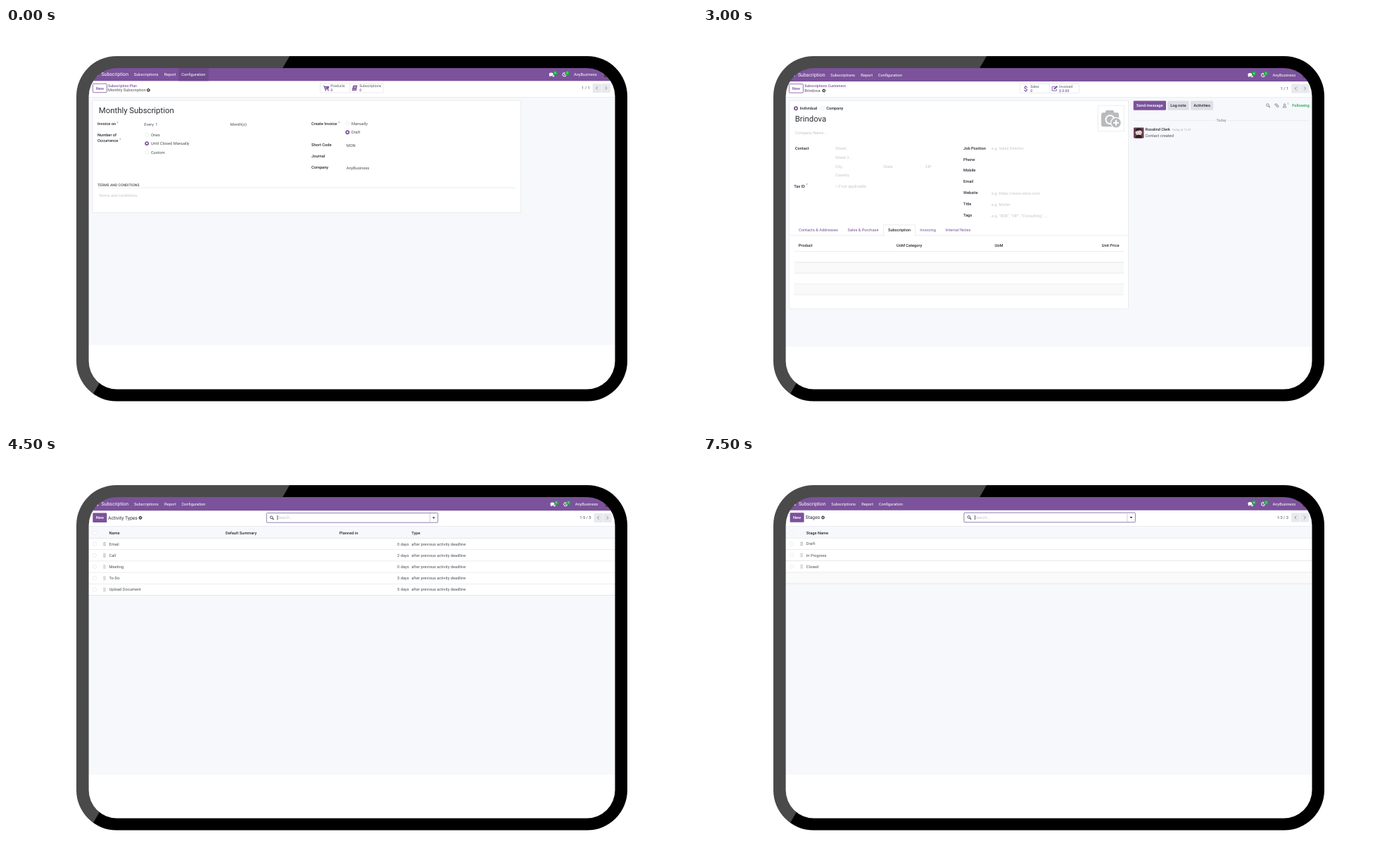
An HTML page with a canvas for the animation above (8 s loop, 982 px wide and 570 px high).

```html
<!DOCTYPE html>
<html lang="en">
<head>
<meta charset="utf-8">
<title>Subscription screens</title>
<style>
html, body { margin: 0; width: 100%; height: 100%; overflow: hidden; background: #fff; }
canvas { display: block; width: 982px; height: 570px; }
</style>
</head>
<body>
<canvas id="stage" width="982" height="570"></canvas>
<script>
const ctx = document.getElementById('stage').getContext('2d');
const PURPLE = '#7b529b', DARK = '#2b2f35', TEXT = '#4d5259', MUTED = '#70757c', FAINT = '#c3c6ca';
const LINE = '#e5e7ea', PAGE = '#f7f8fb', BUTTON = '#dcdfe5', GREEN = '#1fa84b';
const COMPANY = 'AnyBusiness', PERSON = 'Rosalind Clerk', CUSTOMER = 'Brindova';
const BASE = 5.7, TAB_WIDTH = 38.8;
const LEFT = 117, TOP = 57, WIDTH = 749;

// ---- Primitives ----
function text(str, x, y, { size = BASE, color = TEXT, weight = 400, align = 'left' } = {}) {
  ctx.font = `${weight} ${size}px Roboto, sans-serif`;
  ctx.textRendering = 'geometricPrecision';
  ctx.textAlign = align;
  ctx.fillStyle = color;
  ctx.fillText(str, x, y + size * 0.36);
}
const label = (str, x, y, options) => text(str, x, y, { color: DARK, weight: 500, ...options });
const faint = (str, x, y) => text(str, x, y, { color: FAINT });
const help = (x, y) => text('?', x, y, { size: 4.4, color: '#3994b4', weight: 500 });

function rect(x, y, w, h, fill, stroke, radius = 0, width = 0.8) {
  ctx.beginPath();
  ctx.roundRect(x, y, w, h, radius);
  if (fill) { ctx.fillStyle = fill; ctx.fill(); }
  if (stroke) { ctx.strokeStyle = stroke; ctx.lineWidth = width; ctx.stroke(); }
}
function circle(x, y, r, fill, stroke, width = 0.8) {
  ctx.beginPath();
  ctx.arc(x, y, r, 0, Math.PI * 2);
  if (fill) { ctx.fillStyle = fill; ctx.fill(); }
  if (stroke) { ctx.strokeStyle = stroke; ctx.lineWidth = width; ctx.stroke(); }
}
function path(d, x, y, { fill, stroke, width = 0.9 } = {}) {
  const shape = new Path2D(d);
  ctx.save();
  ctx.translate(x, y);
  if (fill) { ctx.fillStyle = fill; ctx.fill(shape); }
  if (stroke) { ctx.strokeStyle = stroke; ctx.lineWidth = width; ctx.stroke(shape); }
  ctx.restore();
}
const rule = (x, y, w, color = LINE) => rect(x, y - 0.4, w, 0.8, color);

// ---- Icons, each centred on its point ----
const gear = (x, y) => {
  ctx.setLineDash([1, 0.7]);
  circle(x, y, 2.1, null, DARK, 0.9);
  ctx.setLineDash([]);
  circle(x, y, 1.5, null, DARK, 1.1);
};
const magnifier = (x, y, color = DARK) => {
  circle(x - 0.6, y - 0.6, 1.8, null, color, 0.8);
  path('M.8 .8L2.7 2.7', x, y, { stroke: color, width: 1.1 });
};
const cart = (x, y) => {
  path('M-4-3H-2.6L-1.5 1.6H3.4M-2.2-2.2H4L3.2.4L-1.7.8Z', x, y, { fill: PURPLE, stroke: PURPLE });
  for (const dx of [-1, 3]) circle(x + dx, y + 3.2, 0.9, PURPLE);
};
const book = (x, y) => {
  path('M-2-3.8H4L2.2 3.8H-3.4Q-4.4 3-3.6 1.8Z', x, y, { fill: PURPLE });
  path('M-1-2H2.4M-1.4-.4H2M-3 2.4H1.6', x, y, { stroke: '#fff', width: 0.6 });
};
const page = (x, y) =>
  path('M-3-4H1L3-2V4H-3ZM-1.6-1H1.6M-1.6.8H1.6M-1.6 2.5H1.6', x, y, { stroke: PURPLE });
const bars = (x, y) => {
  for (let i = 0; i < 5; i++) rect(x - 4.4 + i * 1.8, y + 2.6 - i * 1.6, 1.3, 1.2 + i * 1.6, PURPLE);
};
const pencilBox = (x, y) => {
  path('M1-2.8H-3.6V3.2H2.6V.8', x, y, { stroke: PURPLE });
  path('M-1.4 1.2L-1-.6L3-4L4.4-2.6L.4 1Z', x, y, { fill: PURPLE });
};
const dollar = (x, y) => text('$', x, y, { size: 10, color: PURPLE, weight: 500, align: 'center' });
const camera = (x, y) => {
  const gray = '#b9babc';
  rect(x - 14, y - 10, 25, 20, gray, null, 3);
  rect(x - 8, y - 13.3, 12, 6, gray, null, 2);
  circle(x - 1.5, y, 6, null, '#fff', 2);
  circle(x + 7, y + 4.5, 7.4, gray, '#fff', 1.2);
  path('M-4 0H4M0-4V4', x + 7, y + 4.5, { stroke: '#fff', width: 2 });
};
const star = (x, y) => {
  ctx.beginPath();
  for (let i = 0; i < 10; i++) {
    const r = i % 2 ? 2.6 : 5.6, a = i * Math.PI / 5;
    ctx.lineTo(x + r * Math.sin(a), y - r * Math.cos(a));
  }
  ctx.closePath();
  ctx.strokeStyle = '#62666c';
  ctx.lineWidth = 0.8;
  ctx.stroke();
};
const paperclip = (x, y) => {
  ctx.save();
  ctx.translate(x, y);
  ctx.rotate(-0.8);
  rect(-1.3, -3, 2.6, 6, null, MUTED, 1.3, 0.8);
  rect(-0.3, -1.5, 0.6, 3, MUTED);
  ctx.restore();
};
const user = (x, y, color) => {
  circle(x, y - 1.3, 1.3, null, color, 0.7);
  path('M-2.3 2.7Q-2.2.3 0 .3T2.3 2.7Z', x, y, { stroke: color, width: 0.7 });
};
function avatar(x, y) {
  rect(x, y, 14.5, 14.8, '#6b4055', null, 1);
  circle(x + 7.2, y + 6.6, 4.6, '#e4cfc6');
  path('M-5-.6Q-5-5 0-5T5-.6L2-2.4Z', x + 7.2, y + 6, { fill: '#2a2028' });
  path('M-5 4.6Q-4 0 0 0T5 4.6Z', x + 7.2, y + 10.2, { fill: '#2a2028' });
}

// ---- Controls ----
function button(str, x, y, w, h, fill, color = DARK, stroke) {
  rect(x, y, w, h, fill, stroke, 1.2);
  text(str, x + w / 2, y + h / 2, { color, weight: 500, align: 'center' });
}
const newOutlined = (x, y) => button('New', x, y, 20, 12.5, '#fff', PURPLE, PURPLE);
const newFilled = (x, y) => button('New', x, y, 20, 13.5, PURPLE, '#fff');

function radio(str, x, y, on, options) {
  if (on) circle(x, y, 2.1, '#fff', PURPLE, 1.7);
  else circle(x, y, 2.7, '#fff', LINE, 0.7);
  text(str, x + 5.7, y, options);
}
function checkbox(x, y) {
  rect(x, y, 5.6, 5.6, PURPLE, null, 1);
  path('M1.4 2.9L2.4 4L4.3 1.7', x, y, { stroke: '#fff', width: 0.8 });
}
function pager(str, x, y) {
  text(str, x - 4, y, { align: 'right' });
  for (const [dx, d] of [[0, 'M1-2.2L-1.2 0L1 2.2'], [12.9, 'M-1-2.2L1.2 0L-1 2.2']]) {
    rect(x + dx, y - 6.5, 12.4, 13, '#e7e9ed', null, 1);
    path(d, x + dx + 6.2, y, { stroke: MUTED, width: 0.8 });
  }
}
// Each entry is [icon, icon x, text x, name, value].
function stats(x, y, w, split, entries) {
  rect(x, y - 6.5, w, 13, '#fff', LINE, 1);
  rect(split, y - 6.5, 0.8, 13, LINE);
  for (const [icon, iconX, textX, name, value] of entries) {
    icon(iconX, y);
    text(name, textX, y - 2.8, { size: 5.1 });
    text(value, textX, y + 3, { size: 5.1, color: PURPLE, weight: 500 });
  }
}
function breadcrumb(parent, current, x, y, gearX) {
  text(parent, x, y - 3.3, { size: 5.2, color: PURPLE, weight: 500 });
  text(current, x, y + 3.2);
  gear(gearX, y + 3.2);
}
function tabs(x, y, w, names, active) {
  rule(x, y + 7.5, w);
  for (const [name, tx] of names) {
    const on = name === active;
    if (on) path(`M${tx - 6.5} ${y + 7.9}V${y - 7.5}H${tx + TAB_WIDTH}V${y + 7.9}`, 0, 0,
      { fill: '#fff', stroke: LINE, width: 0.8 });
    text(name, tx, y, { color: on ? DARK : PURPLE, weight: on ? 500 : 400 });
  }
}
function photoBox(x, y) {
  rect(x, y, 37, 36.5, '#fff', LINE);
  camera(x + 18.7, y + 20);
}
function search(x, y, cursor) {
  rect(x, y - 6.8, 243.5, 13.6, '#fff', '#8573a7', 1, 0.9);
  rect(x + 231.7, y - 6.5, 0.7, 13, '#c3b5cf');
  path('M-2-1H2L0 1.3Z', x + 237.5, y, { fill: DARK });
  magnifier(x + 7.5, y);
  faint('Search...', x + 15.2, y);
  if (cursor) rect(x + 15.2, y - 3.3, 0.7, 6.6, DARK);
}
function chatter(dx, dy, message, followers, follow, followX, followColor) {
  ctx.save();
  ctx.translate(dx, dy);
  button('Send message', 612.7, 102.8, 46.3, 13.4, PURPLE, '#fff');
  button('Log note', 661, 102.8, 30.6, 13.4, BUTTON);
  button('Activities', 694, 102.8, 32, 13.4, BUTTON);
  magnifier(804, 109.5, MUTED);
  paperclip(816.5, 109.5);
  const userColor = followers === '0' ? FAINT : MUTED;
  user(827.5, 109.7, userColor);
  text(followers, 831, 107, { size: 4.2, color: userColor });
  text(follow, followX, 109.5, { color: followColor, weight: 500 });
  rule(613, 130.8, 116);
  rule(746, 130.8, 116);
  text('Today', 737.5, 130.8, { size: 5.3, color: '#92969c', weight: 500, align: 'center' });
  avatar(613, 141);
  label(PERSON, 629.5, 143.7, { size: 5.5 });
  text('Today at 12:41', 667.5, 143.9, { size: 4.2, color: '#acb0b5' });
  text(message, 629.5, 152);
  ctx.restore();
}

// ---- Shared page parts ----
function pageBase({ navX, navY, companyX, bottom, active }) {
  const navHeight = navY + 9.2 - TOP;
  rect(LEFT, TOP, WIDTH, bottom - TOP, PAGE);
  rect(LEFT, TOP, WIDTH, 41, '#fff');
  rule(LEFT, 98.4, WIDTH);
  rect(LEFT, TOP, WIDTH, navHeight, PURPLE);
  const items = [['Subscriptions', 46.3, 34.7], ['Report', 89.3, 17], ['Configuration', 113.8, 34.4]];
  for (const [name, dx, w] of items) {
    if (name === active) rect(navX + dx - 4, TOP, w + 8, navHeight, '#6f4a8d');
    text(name, navX + dx, navY, { color: '#fff' });
  }
  text('Subscription', navX, navY, { size: 6.9, color: '#fff' });
  rect(navX - 6.5, navY + 0.5, 2, 1.8, '#fff');

  const chatX = companyX - 32, clockX = companyX - 13.5;
  path('M-3.2-.3A3 2.3 0 1 1 0 2L-2.5 3Z', chatX, navY, { fill: '#fff' });
  path('M0 2.6Q3 2.6 3.4 0Q5 2 3.6 3.6L1.8 3Z', chatX, navY, { fill: '#fff' });
  circle(clockX, navY + 0.2, 2.6, null, '#fff', 1);
  path('M0-1.6V.4H1.6', clockX, navY, { stroke: '#fff', width: 0.8 });
  for (const [x, n] of [[chatX + 5.5, '6'], [clockX + 4.2, '2']]) {
    circle(x, navY - 2, 3.1, GREEN);
    text(n, x, navY - 2, { size: 4, color: '#fff', align: 'center' });
  }
  text(COMPANY, companyX, navY, { color: '#fff' });
  rect(companyX + 43, navY - 4, 8, 8, '#55394a');
}
function listBase(title, gearX, x, total, pagerX, searchX, cursor, y) {
  newFilled(x, y - 6.8);
  text(title, x + 21.8, y, { size: 6.8, color: DARK });
  gear(gearX, y);
  search(searchX, y, cursor);
  pager(total, pagerX, y);
}
function listRows(x, names, edges, striped = []) {
  rect(LEFT, 115.5, WIDTH, edges.at(-1) - 115.5, '#fff');
  for (const i of striped) rect(LEFT, edges[i], WIDTH, edges[i + 1] - edges[i], '#fafafb');
  for (const y of edges) rule(LEFT, y, WIDTH);
  circle(x, 108, 2.7, '#fff', LINE, 0.7);
  names.forEach((name, i) => {
    const y = (edges[i] + edges[i + 1]) / 2;
    circle(x, y, 2.7, '#fff', LINE, 0.7);
    for (let k = 0; k < 6; k++) rect(x + 12.5 + k % 2 * 1.9, y - 2.5 + (k >> 1) * 2, 1.1, 1.1, '#8e9298');
    text(name, x + 20.6, y);
  });
}

// ---- Screens ----
function planScreen() {
  pageBase({ navX: 135.5, navY: 66, companyX: 807, bottom: 450.5, active: 'Configuration' });
  newOutlined(123.4, 79.2);
  breadcrumb('Subscription Plan', 'Monthly Subscription', 145, 85.1, 202.4);
  stats(446.5, 85.4, 89.5, 488.3, [
    [cart, 455, 461.3, 'Products', '0'], [book, 495.5, 502.3, 'Subscriptions', '0']]);
  pager('1 / 1', 833.6, 85.4);
  rect(123.2, 103, 608.5, 159.5, '#fff', LINE);
  text('Monthly Subscription', 131.8, 117, { size: 11.35, color: DARK });
  label('Invoice on', 130, 135.7);
  help(157.5, 134.2);
  text('Every', 196.3, 136.5);
  text('1', 212.3, 136.5);
  text('Month(s)', 318.7, 136.5);
  label('Number of', 130, 151.7);
  label('Occurrence', 130, 160);
  help(161, 158);
  ['Ones', 'Until Closed Manually', 'Custom'].forEach((name, i) => radio(name, 200.2, 151.7 + i * 12.4, i === 1));
  label('Create Invoice', 434, 135.7);
  help(472, 134.2);
  radio('Manually', 485.3, 135.7);
  radio('Draft', 485.3, 148.3, true);
  label('Short Code', 434, 166);
  text('MON', 483.7, 167);
  label('Journal', 434, 182);
  label('Company', 434, 197.8);
  text(COMPANY, 483.7, 198.5);
  label('TERMS AND CONDITIONS', 130, 223, { size: 5.1, color: TEXT });
  rule(130, 227.2, 595);
  faint('Terms and conditions.', 131.5, 238.3);
}

function productScreen() {
  pageBase({ navX: 137, navY: 66.3, companyX: 810, bottom: 451.5 });
  newOutlined(124.4, 79.3);
  breadcrumb('Products', 'New', 146, 85.4, 161.7);
  path('M-2 2H2Q3.2 1 2-.5Q1.6-2.6-.4-2Q-2-1.8-2-.3Q-3.6.8-2 2Z', 174.4, 88.5, { fill: DARK });
  path('M-1.6-1.6L1.6 1.6M1.6-1.6L-1.6 1.6', 185, 88.6, { stroke: DARK, width: 1.2 });
  stats(450.5, 85.6, 86.3, 494.3, [
    [page, 459, 465.5, 'Documents', '0'], [bars, 502.3, 508.5, 'Sold', '0.00']]);
  button('Print Labels', 124.3, 102.6, 39.6, 13.6, BUTTON);
  rect(124.3, 119.8, 481.5, 145.8, '#fff', LINE);
  label('Product', 131.2, 130.3);
  star(136.7, 141.8);
  text('Monthly Sunscription Product', 151.8, 142.3, { size: 11.4, color: DARK });
  photoBox(562.5, 126);
  checkbox(131.3, 158.4);
  text('Sales', 139.8, 161.2);
  checkbox(159.8, 158.4);
  text('Purchase', 168.5, 161.2);
  tabs(124.3, 180.5, 481.5, [['General Information', 138], ['Attributes & Variants', 201.8],
    ['Sales', 267.3], ['Subscription', 294.5]], 'Subscription');
  label('SUBSCRIPTION', 131.2, 208.7, { size: 5.1, color: TEXT });
  rule(131, 212.7, 227);
  label('Is Subscription', 131.2, 226.4);
  help(170.8, 224.8);
  checkbox(188.3, 223.8);
  label('Subscription Plan', 131.2, 241);
  help(177.6, 239.4);
  text('Monthly Subscription', 189.8, 241.8);
  chatter(0, 0, 'Creating a new record...', '0', 'Follow', 845.5, TEXT);
}

function customerScreen() {
  pageBase({ navX: 135, navY: 66.7, companyX: 809.5, bottom: 453 });
  newOutlined(122.4, 79.6);
  breadcrumb('Subscriptions Customers', CUSTOMER, 144.3, 85.8, 171.8);
  stats(450, 86, 84.5, 492.3, [
    [dollar, 458.7, 465.2, 'Sales', '0'], [pencilBox, 499.8, 506, 'Invoiced', '$ 0.00']]);
  pager('1 / 1', 836.3, 86);
  rect(122.5, 103.3, 482, 295.7, '#fff', LINE);
  radio('Individual', 132, 114.2, true, { color: DARK, weight: 500 });
  radio('Company', 169.5, 114.2, false, { color: DARK, weight: 500 });
  text(CUSTOMER, 130.7, 129, { size: 11.4, color: DARK });
  faint('Company Name...', 130.7, 149);
  photoBox(561.3, 110.2);
  label('Contact', 130.7, 171);
  for (const [str, x, y] of [['Street...', 188, 171.3], ['Street 2...', 188, 184], ['City', 188, 196.7],
    ['State', 256.2, 196.7], ['ZIP', 316, 196.7], ['Country', 188, 209.2], ['/ if not applicable', 188, 225]])
    faint(str, x, y);
  label('Tax ID', 129.2, 224.5);
  help(146.4, 222.5);
  const fields = [['Job Position', 'e.g. Sales Director'], ['Phone'], ['Mobile'], ['Email'],
    ['Website', 'e.g. https://www.odoo.com'], ['Title', 'e.g. Mister'], ['Tags', 'e.g. "B2B", "VIP", "Consulting", ...']];
  fields.forEach(([name, hint], i) => {
    const y = 170.6 + i * 15.9;
    label(name, 370, y);
    if (hint) faint(hint, 410, y + 0.6);
  });
  tabs(122.5, 287.4, 482, [['Contacts & Addresses', 136], ['Sales & Purchase', 205.6],
    ['Subscription', 263], ['Invoicing', 308.2], ['Internal Notes', 344.7]], 'Subscription');
  for (const [name, x] of [['Product', 135.7], ['UoM Category', 275], ['UoM', 414.5], ['Unit Price', 566.7]])
    label(name, x, 309.3);
  for (let i = 0; i < 5; i++) {
    const y = 317.6 + i * 15.4;
    if (i % 2) rect(129.5, y, 468.5, 15.4, '#f9f9fa');
    rule(129.5, y, 468.5);
  }
  chatter(-1, 0.6, 'Contact created', '1', 'Following', 838.2, GREEN);
}

function activityScreen() {
  pageBase({ navX: 135.6, navY: 67, companyX: 808.7, bottom: 451.5 });
  listBase('Activity Types', 191, 123.3, '1-5 / 5', 835.5, 370.3, true, 86.4);
  for (const [name, x] of [['Name', 146.4], ['Default Summary', 312], ['Planned in', 473.7], ['Type', 576.2]])
    label(name, x, 107.8);
  const edges = [0, 1, 2, 3, 4, 5].map(i => 115.5 + i * 16.2);
  listRows(125.9, ['Email', 'Call', 'Meeting', 'To-Do', 'Upload Document'], edges);
  [0, 2, 0, 5, 5].forEach((days, i) => {
    const y = edges[i] + 8.1;
    text(`${days} days`, 572.6, y, { align: 'right' });
    text('after previous activity deadline', 576.2, y);
  });
}

function reasonScreen() {
  pageBase({ navX: 136.4, navY: 67, companyX: 808.3, bottom: 451, active: 'Subscriptions' });
  listBase('Subscription Stop Reason', 227.8, 124, '1-1 / 1', 834.7, 370.6, false, 86.4);
  label('Reason', 147.2, 107.8);
  listRows(126.6, ['Renewal Limit Exceeded'], [115.5, 132, 147.5, 163, 178.3], [1, 3]);
}

function stageScreen() {
  pageBase({ navX: 136, navY: 66.6, companyX: 809.6, bottom: 451.5 });
  listBase('Stages', 170.5, 123.6, '1-3 / 3', 836, 370.9, true, 86);
  label('Stage Name', 146.8, 107.5);
  listRows(126.2, ['Draft', 'In Progress', 'Closed'], [115.2, 131.4, 147.5, 163.8, 180], [3]);
}

// ---- Tablet and playback ----
// The bezel lies over the screen; a hard gradient stop splits it into gray and black.
const bezel = new Path2D();
bezel.roundRect(100, 40, 783, 490.5, 57);
bezel.roundRect(117.6, 57, 747.9, 456.5, 40);
const shine = ctx.createLinearGradient(402.57, 39.75, 403.43, 40.25);
shine.addColorStop(0, '#4a4a4a');
shine.addColorStop(1, '#000');

const LOOP = 8000, HOLD = 1500;
const screens = [planScreen, productScreen, customerScreen, activityScreen, reasonScreen, stageScreen];
const start = performance.now();

function draw() {
  const time = (performance.now() - start) % LOOP;
  rect(0, 0, 982, 570, '#fff');
  screens[Math.floor(time / HOLD)]();
  ctx.fillStyle = shine;
  ctx.fill(bezel, 'evenodd');
  requestAnimationFrame(draw);
}
draw();
</script>
</body>
</html>
```
